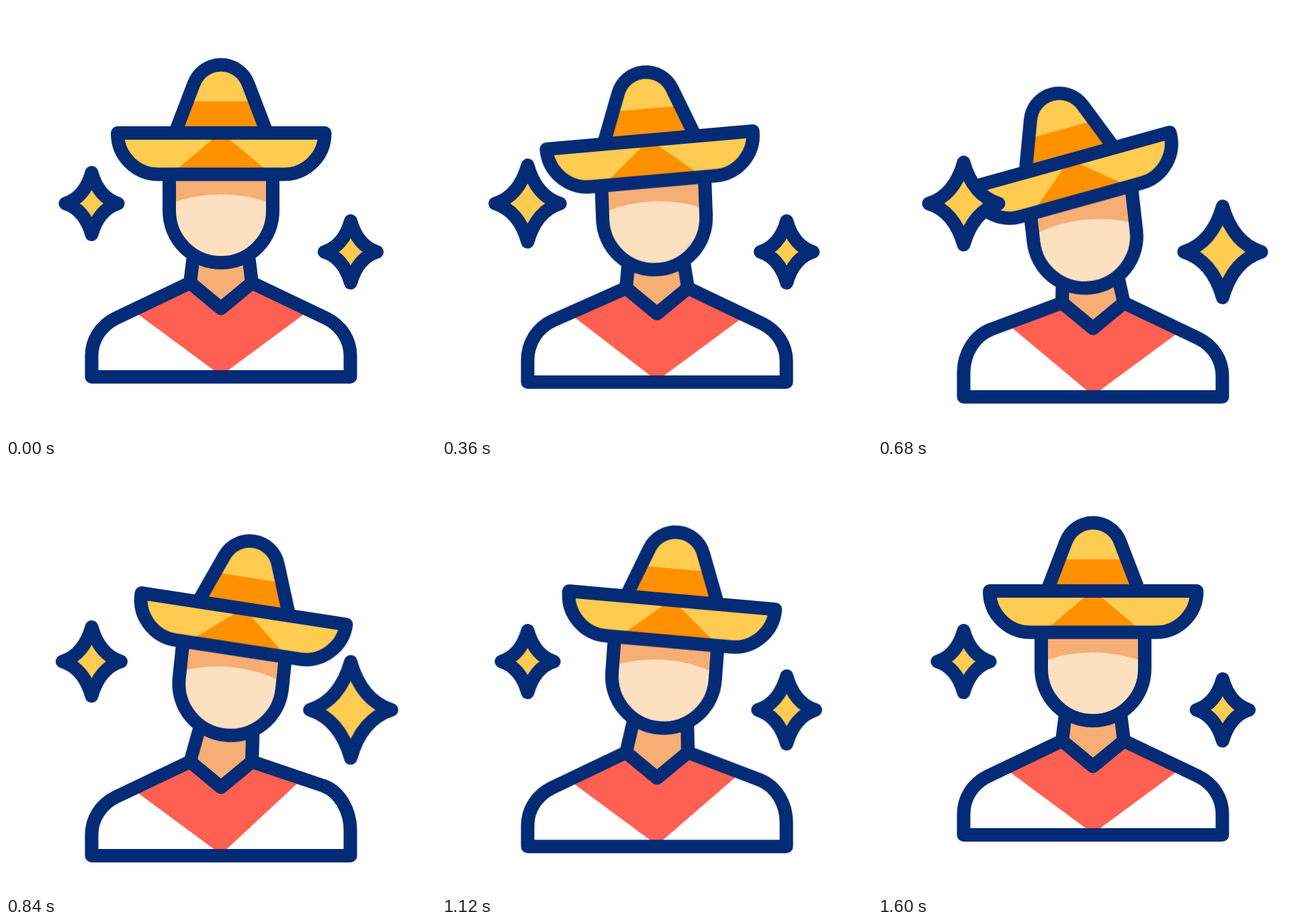
These frames come from a looping animation (640 by 640 pixels, 1680 ms). An HTML page without scripts:

```html
<!DOCTYPE html>
<html lang="en">
<head>
<meta charset="utf-8">
<title>Dancer in a sombrero</title>
<style>
  html, body { margin: 0; width: 100%; height: 100%; overflow: hidden; background: #fff; }
  svg { display: block; width: 640px; height: 640px; }

  .line { fill: none; stroke: #042b75; stroke-width: 20; stroke-linejoin: round; stroke-linecap: round; }
  .yellow { fill: #ffcb50; }
  .orange { fill: #ff9100; }
  .skin { fill: #fce0bf; }
  .shade { fill: #f6ae74; }
  .red { fill: #ff6051; }

  .drop, .head, .hat, .neck, .torso, .bib, .star {
    animation: 1680ms cubic-bezier(.37, 0, .63, 1) infinite;
  }
  .drop { animation-name: drop; }
  .head { animation-name: head; transform-origin: 320px 305px; }
  .hat { animation-name: hat; transform-origin: 320px 250px; }
  .neck { animation-name: neck; transform-origin: 320px 412px; }
  .torso { animation-name: torso; }
  .bib { animation-name: bib; }
  .star { vector-effect: non-scaling-stroke; }
  .left { animation-name: twinkle-left; }
  .right { animation-name: twinkle-right; }

  @keyframes drop {
    0%, 9.52%, 83.33%, 100% { transform: translateY(0); }
    45.24%, 52.38% { transform: translateY(31px); }
  }

  /* Lean left, swing right, settle upright */
  @keyframes head {
    0%, 9.52%, 76.79%, 100% { transform: translate(0, 0) rotate(0deg); }
    40.48% { transform: translate(-12px, 8px) rotate(-6.5deg); }
    50.6% { transform: translate(14.5px, -9.2px) rotate(6.1deg); animation-timing-function: cubic-bezier(.65, 0, .75, .65); }
  }
  @keyframes hat {
    0%, 9.52%, 94.05%, 100% { transform: translate(0, 0) rotate(0deg); }
    40.48% { transform: translate(0, 0) rotate(-9deg); }
    50.6% { transform: translate(4.8px, 3px) rotate(2.8deg); animation-timing-function: cubic-bezier(.65, 0, .75, .65); }
    76.79% { transform: translate(0, 0) rotate(-3.1deg); }
  }
  @keyframes neck {
    0%, 9.52%, 76.79%, 100% { transform: skewX(0deg); }
    40.48% { transform: skewX(5.7deg); }
    50.6% { transform: skewX(-9deg); animation-timing-function: cubic-bezier(.65, 0, .75, .65); }
  }
  @keyframes torso {
    0%, 9.52%, 76.79%, 100% {
      d: path("M127.5 552V521C127.5 497 141 476 163 465L274 412L320 450L366 412L477 465C499 476 512.5 497 512.5 521V552Z");
    }
    40.48% {
      d: path("M127.5 552V516C127.5 488 143 462 167 452L274 412L320 450L366 412L477 465C499 476 512.5 497 512.5 521V552Z");
    }
    50.6% {
      d: path("M127.5 552V521C127.5 497 141 476 163 465L274 412L320 450L366 412L473 448C497 457 512.5 485 512.5 514V552Z");
      animation-timing-function: cubic-bezier(.65, 0, .75, .65);
    }
  }
  @keyframes bib {
    0%, 9.52%, 76.79%, 100% { d: path("M320 550L188 452.5L274 412L320 450L366 412L452 452.5Z"); }
    40.48% { d: path("M320 550L192 443L274 412L320 450L366 412L452 452.5Z"); }
    50.6% {
      d: path("M320 550L188 452.5L274 412L320 450L366 412L441 437.5Z");
      animation-timing-function: cubic-bezier(.65, 0, .75, .65);
    }
  }

  @keyframes twinkle-left {
    0%, 6.5%, 59.52%, 100% { transform: scale(1); }
    33.33% { transform: scale(1.4); }
  }
  @keyframes twinkle-right {
    0%, 21.43%, 73.81%, 100% { transform: scale(1); }
    47.62% { transform: scale(1.57); }
  }
</style>
</head>
<body>
<svg viewBox="0 0 640 640">
  <g class="drop">
    <path class="bib red" d="M320 550L188 452.5L274 412L320 450L366 412L452 452.5Z"/>
    <path class="shade" d="M274 412H366L320 450Z"/>
    <g class="neck">
      <path class="shade" d="M274 413L281.5 352H358.5L366 413Z"/>
      <path class="line" d="M274 412L281.5 352M366 412L358.5 352"/>
    </g>
    <path class="torso line" d="M127.5 552V521C127.5 497 141 476 163 465L274 412L320 450L366 412L477 465C499 476 512.5 497 512.5 521V552Z"/>

    <g class="head">
      <path class="skin" d="M243 235V305A77 77 0 0 0 397 305V235Z"/>
      <path class="shade" d="M243 235H397V294.5Q320 266 243 294.5Z"/>
      <path class="line" d="M243 235V305A77 77 0 0 0 397 305V235"/>

      <g class="hat">
        <path class="yellow" d="M251.5 189L279.5 116A43 43 0 0 1 360.5 116L388.5 189Z"/>
        <path class="orange" d="M251.5 189L269.5 142H370.5L388.5 189Z"/>
        <path class="line" d="M251.5 189L279.5 116A43 43 0 0 1 360.5 116L388.5 189"/>
        <path class="yellow" d="M166 189H474.5A61 61 0 0 1 413.5 250.5H227A61 61 0 0 1 166 189Z"/>
        <path class="orange" d="M320 188L393 249H247Z"/>
        <path class="line" d="M166 189H474.5A61 61 0 0 1 413.5 250.5H227A61 61 0 0 1 166 189Z"/>
      </g>
    </g>
  </g>

  <g transform="translate(127.5 294)">
    <path class="star left line yellow" d="M0-46Q10.5-9 39 0Q10.5 9 0 46Q-10.5 9-39 0Q-10.5-9 0-46Z"/>
  </g>
  <g transform="translate(513 366)">
    <path class="star right line yellow" d="M0-46Q10.5-9 39 0Q10.5 9 0 46Q-10.5 9-39 0Q-10.5-9 0-46Z"/>
  </g>
</svg>
</body>
</html>
```
